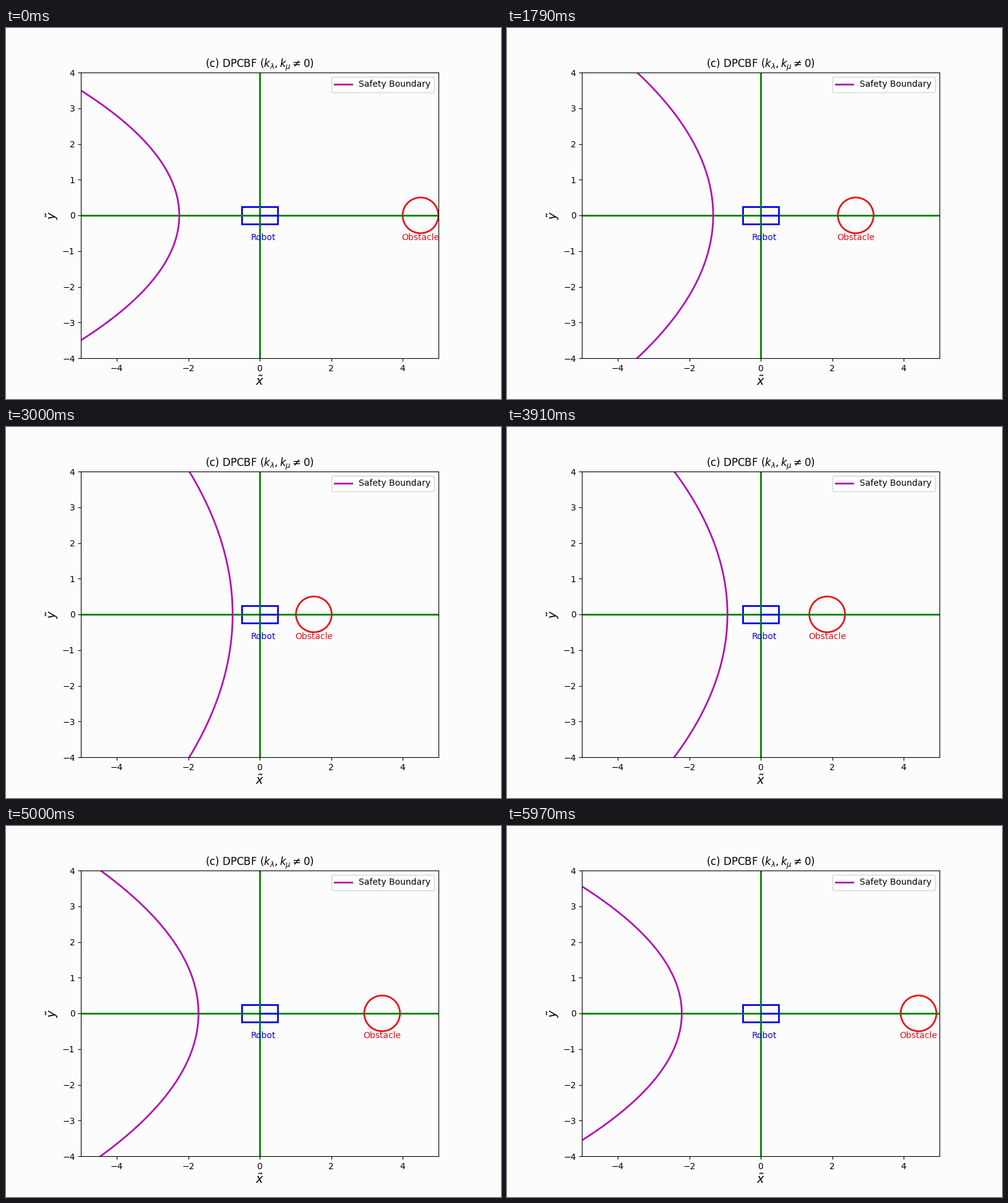
Recreate the animation shown at these times as a matplotlib script. Size 800x600 px, loop 6000 ms.

```python
import numpy as np
import matplotlib.pyplot as plt
from matplotlib.animation import FuncAnimation
from matplotlib.patches import Circle, Rectangle

FRAMES, INTERVAL = 200, 30
RATE, STEPS = 15, 90          # the pose is refreshed 15 times a second
DT = 0.05                     # time grid of the simulation
PAPER = "#fcfcfc"
BLUE, BLUE_TEXT = "#0404e4", "#0808cc"
RED, RED_TEXT = "#e8141c", "#d8141c"
PURPLE = "#b20eb2"

plt.rcParams["font.family"] = "DejaVu Sans"
fig = plt.figure(figsize=(8, 6), dpi=100, facecolor=PAPER)
ax = fig.add_subplot(facecolor=PAPER)
ax.set_aspect("equal")
ax.set(xlim=(-5, 5), ylim=(-4, 4),
       xticks=range(-4, 5, 2), yticks=range(-4, 5))
ax.set_title(r"(c) DPCBF ($k_\lambda, k_\mu \neq 0$)", pad=5.5)
ax.set_xlabel(r"$\tilde{x}$", fontsize=14, labelpad=3)
ax.set_ylabel(r"$\tilde{y}$", fontsize=14, labelpad=3)

ax.axhline(0, color="green", lw=2)
ax.axvline(0, color="green", lw=2)

ax.add_patch(Rectangle((-0.5, -0.25), 1, 0.5, fill=False, ec=BLUE, lw=2))
ax.plot([0, 0.5], [0, 0], color=BLUE, lw=2)
ax.text(-0.25, -0.7, "Robot", color=BLUE_TEXT)

obstacle = ax.add_patch(Circle((4.5, 0), 0.5, fill=False, ec=RED, lw=2))
label = ax.text(4.5, -0.7, "Obstacle", color=RED_TEXT)

y = np.linspace(-5, 5, 300)
boundary, = ax.plot([], [], color=PURPLE, lw=2, label="Safety Boundary")
ax.legend(loc="upper right")


def distance(t):
    return 3 + 1.5 * np.cos(t)


def update(i):
    step = min(int(i * INTERVAL / 1000 * RATE + 0.46), STEPS - 1)
    t = round(step / RATE / DT) * DT
    d = distance(t)
    obstacle.center = (d, 0)
    label.set_x(d - 0.53)
    boundary.set_data(-d * (0.5 + 0.05 * y**2), y)
    return obstacle, label, boundary


anim = FuncAnimation(fig, update, frames=FRAMES, interval=INTERVAL,
                     repeat=True, repeat_delay=0)
plt.show()
```
